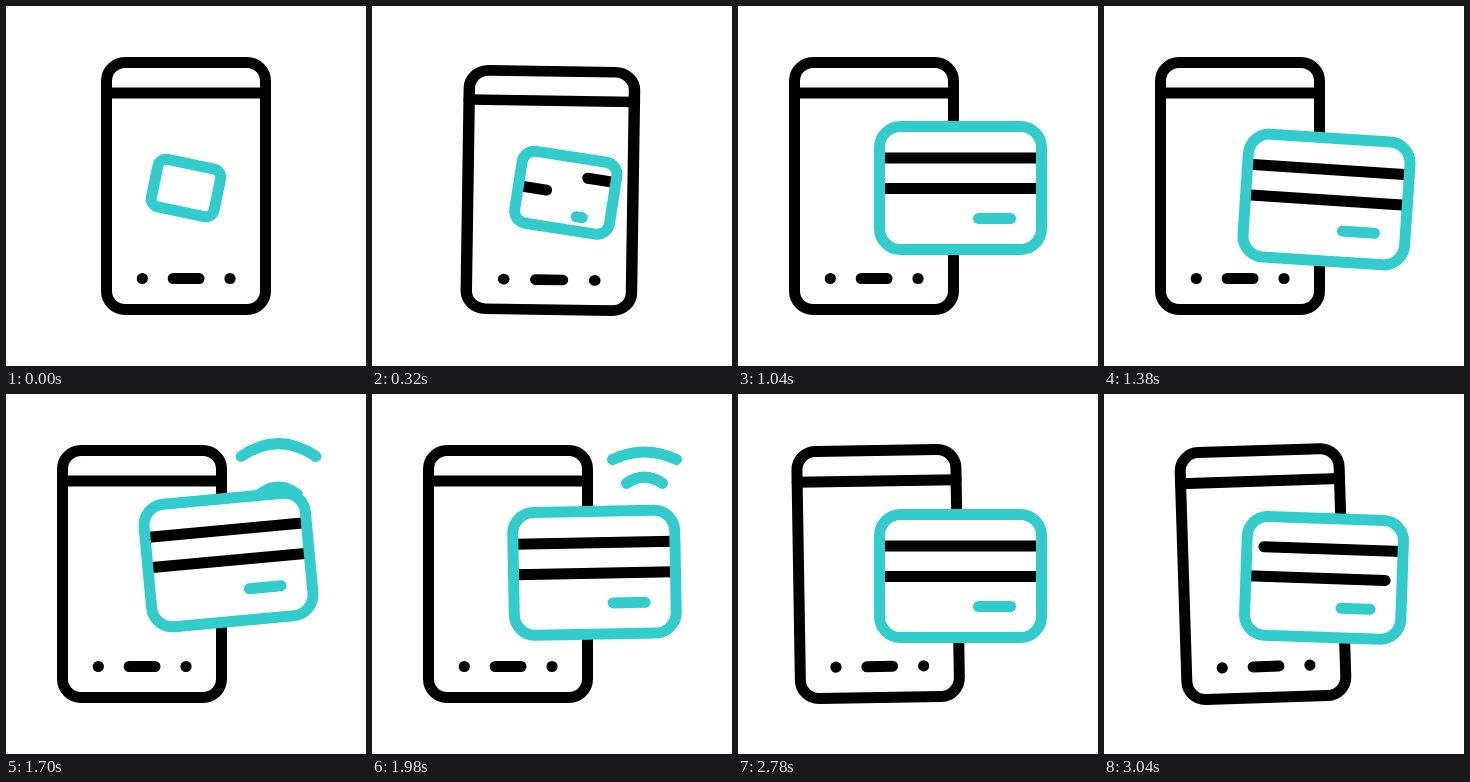
Animation of 360x360 px, one loop 3060 ms. Source, as an HTML page with a canvas:

```html
<!DOCTYPE html>
<html lang="en">
<head>
<meta charset="utf-8">
<title>Mobile card payment</title>
<style>
html, body { margin: 0; width: 100%; height: 100%; overflow: hidden; background: #fff; }
canvas { display: block; width: 360px; height: 360px; }
</style>
</head>
<body>
<canvas id="stage"></canvas>
<script>
const LOOP = 3060, HOLD = 80, BLACK = '#000', TEAL = '#33cccc';
const RAD = Math.PI / 180;
const stage = document.getElementById('stage');
const ratio = window.devicePixelRatio || 1;
stage.width = stage.height = 360 * ratio;
const ctx = stage.getContext('2d');

// Timing helpers: progress, sine ease, bump, and cubic ease with its speed
const part = (t, from, to) => Math.min(1, Math.max(0, (t - from) / (to - from)));
const ease = (t, from, to) => (1 - Math.cos(Math.PI * part(t, from, to))) / 2;
const bump = (t, from, to) => Math.sin(Math.PI * part(t, from, to));
const cubic = (t, from, to) => {
  const u = part(t, from, to);
  return u < 0.5 ? 4 * u ** 3 : 1 - 4 * (1 - u) ** 3;
};
const cubicSpeed = (t, from, to) => {
  const u = part(t, from, to);
  return 12 * Math.min(u, 1 - u) ** 2 / (to - from);
};

// Opens over the given duration; closing mirrors it and is cut off by the loop.
const open = (t, duration) => ease(t, 20, 20 + duration) - ease(t, 3700 - duration, 3700);

function line(x0, x1, y) {
  ctx.beginPath();
  ctx.moveTo(x0, y);
  ctx.lineTo(x1, y);
  ctx.stroke();
}

function box(w, h, r) {
  ctx.beginPath();
  ctx.roundRect(-w, -h, 2 * w, 2 * h, r);
}

function dot(x, y) {
  ctx.beginPath();
  ctx.arc(x, y, 5.6, 0, Math.PI * 2);
  ctx.fill();
}

// The phone leans back against its speed and squashes as it slides aside.
function drawPhone(t) {
  const away = [80, 970], back = [2380, 3600];
  const shift = cubic(t, ...away) - cubic(t, ...back);
  const speed = cubicSpeed(t, ...away) - cubicSpeed(t, ...back);
  const squash = bump(t, 0, 960);
  ctx.save();
  ctx.translate(180 - 44 * shift, 309);
  ctx.rotate(880 * speed * RAD);
  ctx.scale(1 + 0.045 * squash, 1 - 0.04 * squash);
  ctx.translate(0, -129);
  ctx.strokeStyle = ctx.fillStyle = BLACK;
  box(79.5, 123.5, 18.5);
  ctx.stroke();
  line(-79.5, 79.5, -93);
  line(-12.8, 13, 92.5);
  dot(-43.7, 92.5);
  dot(44, 92.5);
  ctx.restore();
}

// A signal arc rises from behind the card, overshoots, rests and sinks back.
function drawWave(t, delay, restY, restHalf, restSag) {
  const rise = ease(t - delay, 1380, 1600) - ease(t, 2480, 2740);
  if (rise <= 0) return;
  const over = bump(t - delay, 1400, 1900);
  const y = 150 + (restY - 150) * rise - 3.2 * over;
  const half = restHalf * (1 + 0.18 * over);
  const sag = restSag * (1 + 0.75 * over);
  ctx.strokeStyle = TEAL;
  ctx.beginPath();
  ctx.moveTo(272.5 - half, y);
  ctx.quadraticCurveTo(272.5, y - 2 * sag, 272.5 + half, y);
  ctx.stroke();
}

function drawCard(t) {
  const grow = open(t, 780), trim = open(t, 830), level = open(t, 900);
  const nod = 11.5 * ease(t, 1100, 1380) - 27.5 * ease(t, 1380, 1700) + 16 * ease(t, 1700, 2100);
  const s = 0.395 + 0.605 * grow;
  const w = 81 * s, h = 61.5 * s, reach = w - 1.5;
  ctx.save();
  ctx.translate(180 + 42.5 * grow, 182 + 6 * Math.sin(Math.PI * trim) + nod);
  ctx.rotate((11.8 * (1 - level) + 0.33 * nod) * RAD);
  box(w, h, 21 * s);
  ctx.fillStyle = '#fff';
  ctx.fill();
  if (grow > 0) {
    const end = reach * (2 * trim - 1);
    ctx.strokeStyle = BLACK;
    line(-end, reach, -30 * s);
    line(-reach, end, 0.5 * s);
    ctx.strokeStyle = TEAL;
    const x = 9 + 25 * grow, len = 16 * grow * s;
    line(x - len, x + len, 18 + 12.5 * grow);
  }
  box(w, h, 21 * s);
  ctx.strokeStyle = TEAL;
  ctx.stroke();
  ctx.restore();
}

function draw(t) {
  ctx.setTransform(ratio, 0, 0, ratio, 0, 0);
  ctx.fillStyle = '#fff';
  ctx.fillRect(0, 0, 360, 360);
  ctx.lineWidth = 11;
  ctx.lineCap = 'round';
  drawPhone(t);
  drawWave(t, 0, 65.5, 32, 7.5);
  drawWave(t, 165, 91, 16.5, 4.5);
  drawCard(t);
}

const start = performance.now();
function tick() {
  const t = (performance.now() - start) % LOOP;
  draw(t < HOLD ? 0 : t);
  requestAnimationFrame(tick);
}
tick();
</script>
</body>
</html>
```
